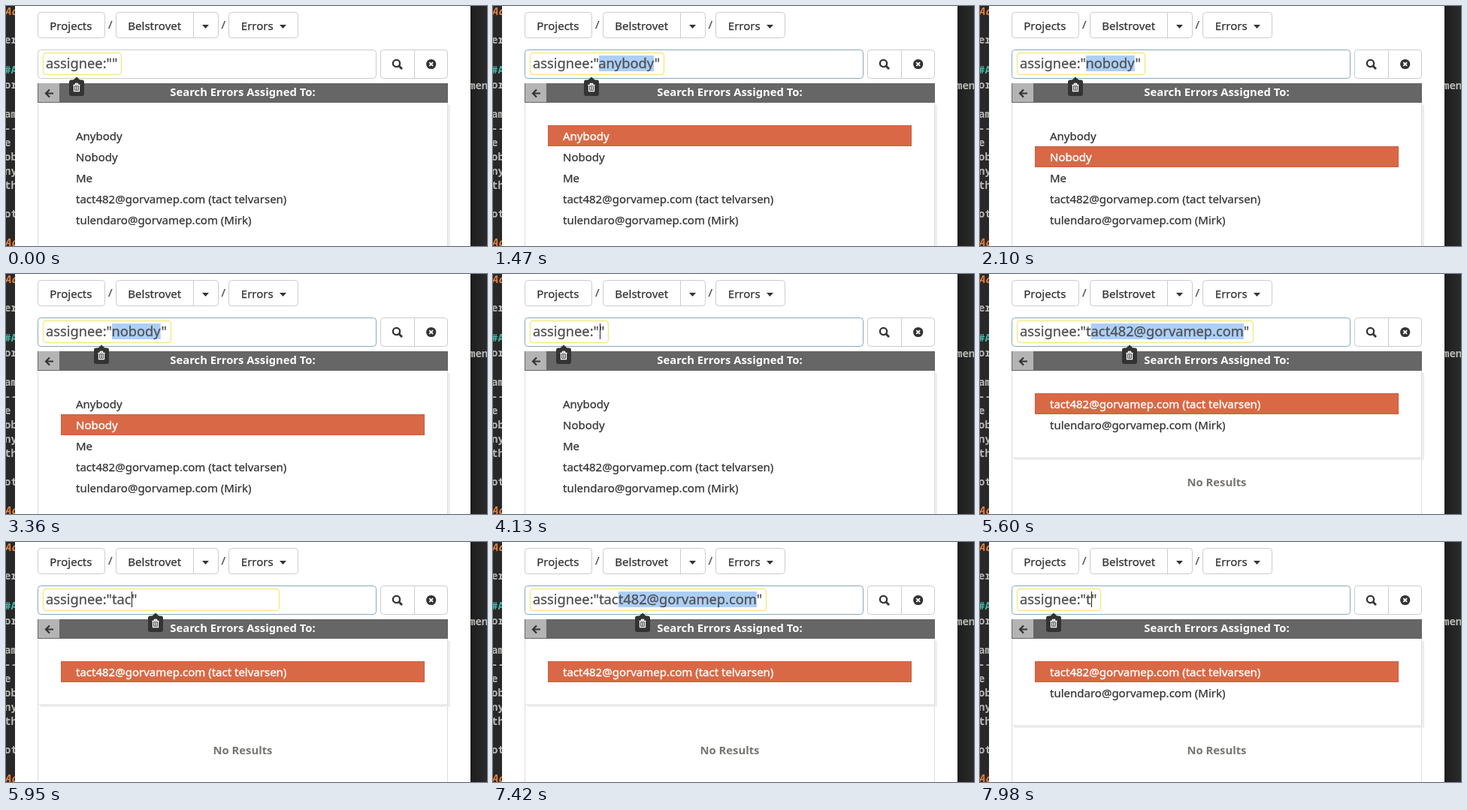
Recreate the animation shown at these times as an HTML page. Size 640 px wide and 320 px high, loop 8 s.

```html
<!DOCTYPE html>
<html lang="en">
<head>
<meta charset="utf-8">
<title>Error search</title>
<style>
html, body { margin: 0; width: 100%; height: 100%; overflow: hidden; background: #282828; }
svg { display: block; width: 640px; height: 320px; font: 15px "Noto Sans", sans-serif; fill: #333; }
text { white-space: pre; stroke: #333; stroke-width: .25; }
.code { font: 600 14px "Noto Sans Mono", monospace; fill: #b8b8b4; }
.code text { stroke: none; }
.orange { fill: #e5803f; font-style: italic; font-weight: bold; }
.teal { fill: #45b8a6; font-weight: bold; }
.box { fill: #fff; stroke: #ccc; }
.bold { font-size: 14.8px; font-weight: bold; text-anchor: middle; stroke: none; }
.slash { fill: #555; }
#field { font-size: 18.3px; fill: #505050; stroke: #505050; stroke-width: .3; }
.on { fill: #fff; stroke: #fff; stroke-width: .4; }
</style>
</head>
<body>
<svg viewBox="0 0 640 320">
  <defs>
    <linearGradient id="edge">
      <stop offset="0" stop-color="#1d1d1d"/>
      <stop offset="1" stop-color="#2b2b2b"/>
    </linearGradient>
  </defs>
  <rect width="640" height="320" fill="#282828"/>
  <rect x="618" width="22" height="320" fill="url(#edge)"/>
  <g id="editor" class="code"></g>
  <rect x="12" width="606" height="320" fill="#fff"/>

  <rect class="box" x="42.5" y="8.5" width="89" height="34" rx="4"/>
  <rect class="box" x="146.5" y="8.5" width="136" height="34" rx="4"/>
  <path class="box" d="M249.5 9v33"/>
  <rect class="box" x="296.5" y="8.5" width="92" height="34" rx="4"/>
  <text x="58.300" y="32">Projects</text>
  <text x="162.300" y="32">Belstrovet</text>
  <text x="312.800" y="32">Errors</text>
  <text class="slash" x="136" y="30">/</text>
  <text class="slash" x="286.500" y="30">/</text>
  <path d="M261 25h9l-4.500 5zM364 25h9l-4.500 5z"/>

  <rect id="input" class="box" x="42.5" y="58.500" width="450" height="38" rx="4"/>
  <rect class="box" x="498.5" y="58.5" width="89" height="38" rx="4"/>
  <path class="box" d="M543.5 59v37"/>
  <g fill="none" stroke="#333" stroke-width="2.3">
    <circle cx="519.500" cy="76.500" r="4.600"/>
    <path d="M523 80l4 4" stroke-width="2.800"/>
  </g>
  <circle cx="565.700" cy="77.500" r="6.600"/>
  <path d="M563.300 75.100l4.800 4.800m0-4.800l-4.800 4.800" stroke="#fff" stroke-width="1.900"/>

  <rect id="bubble" x="49.5" y="62.500" height="29" rx="4" fill="#fff" stroke="#f4e982" stroke-width="1.400"/>
  <rect id="selection" y="66" height="21" fill="#accff8"/>
  <text id="field" x="53" y="83"></text>
  <rect id="caret" y="66" width="1" height="21" fill="#222"/>

  <path d="M42.5 129V320M587.500 129V320" stroke="#ddd"/>
  <text class="bold" x="315" y="283" style="fill:#77756f">No Results</text>
  <rect id="shade" x="46" y="132" width="545" fill="#eee"/>
  <rect id="panel" x="42.5" y="128.500" width="545" fill="#fff" stroke="#ddd"/>
  <g id="list"></g>
  <rect x="42" y="103" width="546" height="26" fill="#666"/>
  <rect x="43" y="103" width="28" height="25" fill="#b4b4b4"/>
  <path d="M63 116.500H53m5-5l-5 5 5 5" fill="none" stroke="#333" stroke-width="2.200"/>
  <text class="bold" x="315" y="120" style="fill:#fff">Search Errors Assigned To:</text>

  <g id="trash">
    <path d="M-6 101L0 95.500 6 101z"/>
    <rect x="-10" y="99.500" width="20" height="21.500" rx="3"/>
    <path d="M-4.500 106.500h9M-1.500 106v-1.500h3v1.500M-3.500 107v7.500h7V107M-1.200 108v5M1.200 108v5" fill="none" stroke="#fff" stroke-width="1.300"/>
  </g>
</svg>
<script>
const $ = id => document.getElementById(id);
const set = (id, attrs) => { for (const k in attrs) $(id).setAttribute(k, attrs[k]); };

const mail = 'tact482@gorvamep.com';
const people = ['Anybody', 'Nobody', 'Me', mail + ' (tact telvarsen)', 'tulendaro@gorvamep.com (Mirk)'];
const all = [0, 1, 2, 3, 4], both = [3, 4], one = [3];

// at, value, first selected character (-1: caret), rows, active row, value the bubble still fits
const steps = [
  [0, '', -1, all, -1],
  [1260, '', -1, all, -1],
  [1400, 'anybody', 0, all, 0],
  [2100, 'nobody', 0, all, 1],
  [4050, '', -1, all, -1],
  [5460, 't', -1, all, -1, ''],
  [5600, mail, 1, both, 0],
  [5740, 'ta', -1, both, 0, mail],
  [5810, mail, 2, one, 0],
  [5950, 'tac', -1, one, 0, mail],
  [6090, mail, 3, one, 0],
  [7560, 'tac', -1, one, 0],
  [7770, 'ta', -1, one, 0],
  [7910, 't', -1, both, 0]
];

const lines = [[12, 'Ac', 'orange'], [50, 'er'], [90, '#A', 'teal'], [110, 'or'], [149, 'am'], [168, '--'],
  [187, 'e'], [206, 'ob'], [225, 'ny'], [244, 'th'], [282, 'ot'], [320, 'Ac', 'orange']];
$('editor').innerHTML = lines.map(([y, s, c = '']) => `<text x="-2" y="${y}" class="${c}">${s}</text>`).join('')
  + '<text x="616" y="111">men</text>';

const pen = document.createElement('canvas').getContext('2d');
pen.font = '18.3px "Noto Sans", sans-serif';
const endOf = s => 53 + pen.measureText(s).width;
const prefix = 'assignee:"';

let shown;
function show(step) {
  const [at, value, from, rows, active, fitted = value] = step;
  const right = Math.round(endOf(prefix + fitted + '"')) + 5.5;
  const end = endOf(prefix + value);
  const start = from < 0 ? end : endOf(prefix + value.slice(0, from));
  const height = 60 + 28 * rows.length;
  $('field').textContent = prefix + value + '"';
  set('input', { style: at ? 'stroke:#86a9ba' : '' });
  set('bubble', { width: right - 49.5 });
  set('selection', { x: start, width: end - start });
  set('caret', { x: Math.round(end + .5) });
  set('trash', { transform: `translate(${Math.round((49 + right) / 2 - 7)} -1)` });
  set('panel', { height: height + .5 });
  set('shade', { height });
  $('list').innerHTML = rows.map((p, i) => {
    const on = i === active, y = 159 + 28 * i;
    return (on ? `<rect x="73.5" y="${y + .5}" width="483" height="27" fill="#d96846" stroke="#c7603f"/>` : '')
      + `<text x="93" y="${y + 20}" class="${on ? 'on' : ''}">${people[p]}</text>`;
  }).join('');
}

function frame() {
  const t = performance.now() % 8000;
  const step = steps.findLast(s => s[0] <= t);
  if (step !== shown) show(shown = step);
  const lit = step[0] && step[2] < 0 && (t - step[0]) % 1000 < 500;
  set('caret', { visibility: lit ? 'visible' : 'hidden' });
  requestAnimationFrame(frame);
}
frame();
</script>
</body>
</html>
```
